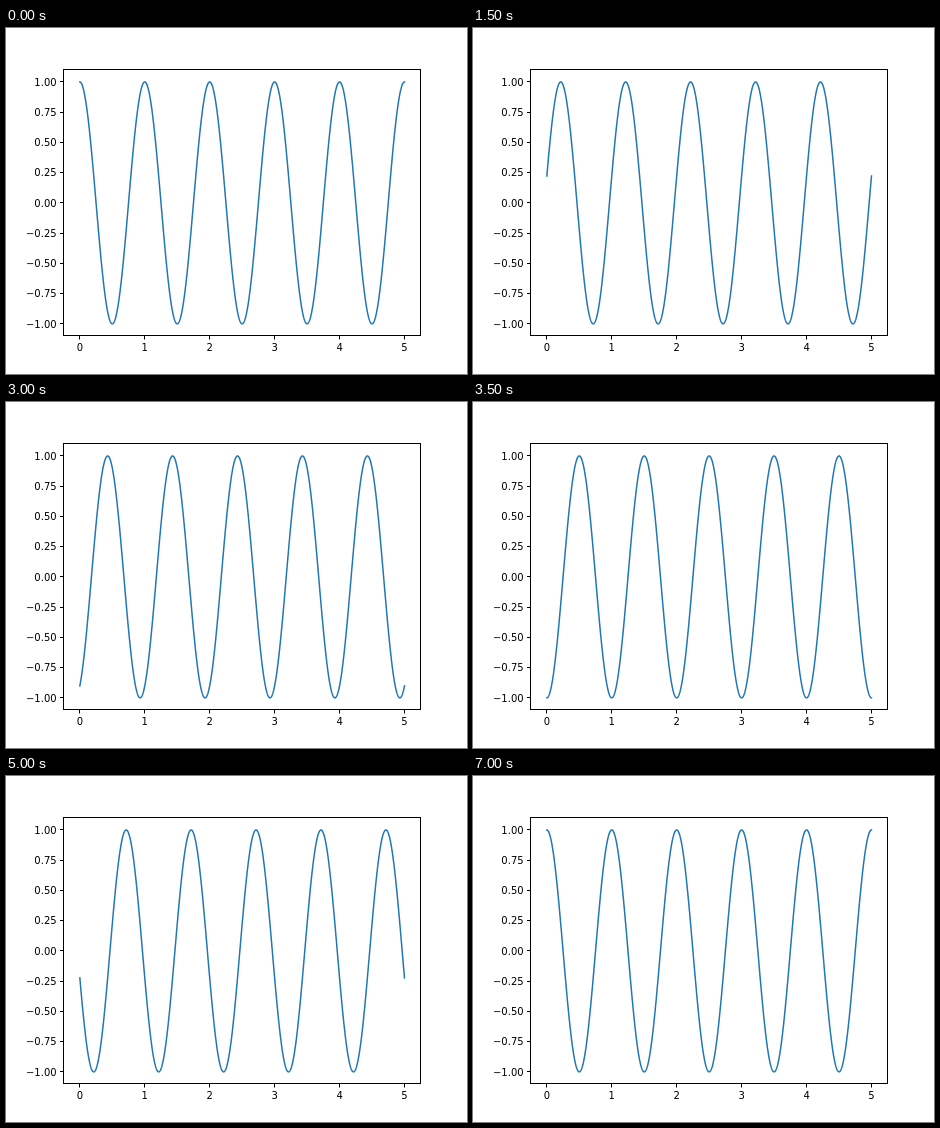
An HTML page with a canvas for the animation above (7500 ms loop, 461x346 px).

```html
<!DOCTYPE html>
<html lang="en">
<head>
<meta charset="utf-8">
<title>Travelling cosine wave</title>
<style>
  html, body { margin: 0; width: 100%; height: 100%; overflow: hidden; background: #fff; }
  canvas { display: block; width: 461px; height: 346px; }
</style>
</head>
<body>
<canvas id="plot" width="461" height="346"></canvas>
<script>
const ctx = document.getElementById('plot').getContext('2d');

const STEP_MS = 500;
const STEPS = 15;
const SAMPLES = 1000;
const axes = { left: 57.6, right: 414.72, top: 41.87, bottom: 307.98 };

const toX = v => axes.left + (axes.right - axes.left) * (v + 0.25) / 5.5;
const toY = v => axes.top + (axes.bottom - axes.top) * (1.1 - v) / 2.2;
const snap = v => Math.floor(v) + 0.5;

function line(x1, y1, x2, y2) {
  ctx.beginPath();
  ctx.moveTo(x1, y1);
  ctx.lineTo(x2, y2);
  ctx.stroke();
}

function drawCurve(phase) {
  ctx.strokeStyle = '#1f77b4';
  ctx.lineWidth = 1.5;
  ctx.lineCap = 'square';
  ctx.lineJoin = 'round';
  ctx.beginPath();
  for (let i = 0; i <= SAMPLES; i++) {
    const x = 5 * i / SAMPLES;
    ctx.lineTo(toX(x), toY(Math.cos(2 * Math.PI * (x - phase))));
  }
  ctx.stroke();
}

function drawAxes() {
  const left = snap(axes.left), right = snap(axes.right);
  const top = snap(axes.top), bottom = snap(axes.bottom);

  ctx.strokeStyle = ctx.fillStyle = '#000';
  ctx.lineWidth = 1;
  ctx.lineCap = 'butt';
  ctx.lineJoin = 'miter';
  ctx.strokeRect(left, top, right - left, bottom - top);

  ctx.font = '10px "DejaVu Sans", sans-serif';
  ctx.textBaseline = 'alphabetic';

  ctx.textAlign = 'center';
  for (let v = 0; v <= 5; v++) {
    const x = toX(v);
    line(snap(x), bottom, snap(x), bottom + 4);
    ctx.fillText(String(v), x, Math.round(axes.bottom + 14.6));
  }

  ctx.textAlign = 'right';
  for (let v = -1; v <= 1; v += 0.25) {
    const y = toY(v);
    line(left - 3.5, snap(y), left, snap(y));
    ctx.fillText(v.toFixed(2).replace('-', '\u2212'), axes.left - 7, Math.round(y + 3.8));
  }
}

function draw(time) {
  const step = Math.floor(time / STEP_MS) % STEPS;
  ctx.fillStyle = '#fff';
  ctx.fillRect(0, 0, 461, 346);
  drawCurve(step / (STEPS - 1));
  drawAxes();
}

const start = performance.now();

function tick() {
  draw(performance.now() - start);
  requestAnimationFrame(tick);
}

tick();
</script>
</body>
</html>
```
